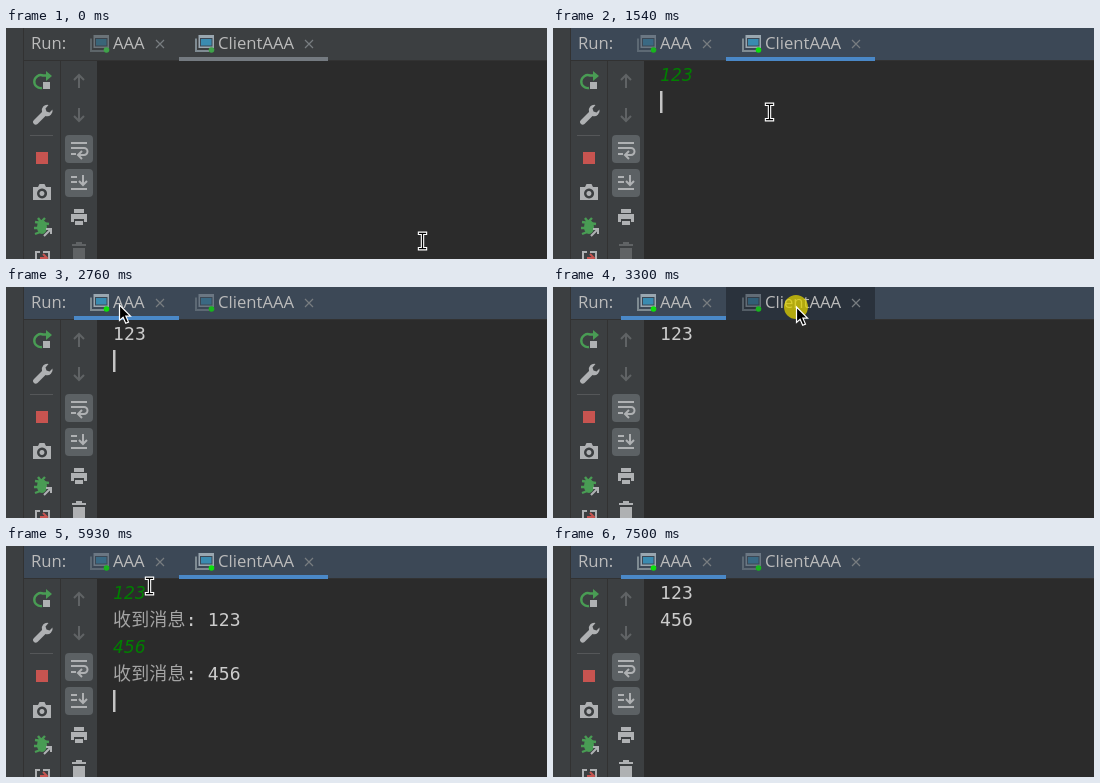
These frames come from a looping animation (541x231 px, 7.59 s). An HTML page:

```html
<!DOCTYPE html>
<html lang="en">
<head>
<meta charset="utf-8">
<title>Run console</title>
<style>
  html, body { margin: 0; width: 100%; height: 100%; overflow: hidden; background: #2b2b2b; }
  svg { display: block; }
  .ui { font: 16.7px "Open Sans", sans-serif; fill: #bbb; }
  .console { font: 18px "DejaVu Sans Mono", "Noto Sans CJK SC", "Noto Sans CJK", monospace; letter-spacing: .16px; fill: #ccc; }
  .label { font-weight: 300; fill: #a4a4a4; }
  .input { font-style: italic; fill: #007f00; }
  .line { fill: none; stroke: #afb1b3; stroke-width: 2; }
  .dim { stroke: #606365; }
  .green { stroke: #499c54; stroke-width: 2.4; }
  .red { stroke: #c75450; }
</style>
</head>
<body>
<svg width="541" height="231" viewBox="0 0 541 231">
  <path fill="#3c3f41" d="M0 0H91V231H0z"/>
  <path id="header" d="M18 0H541V33H18z"/>
  <path fill="#323232" d="M17 0h1v231h-1zM54 33h1v198h-1zM18 32h523v1H18z"/>
  <text class="ui" x="25" y="21">Run:</text>
  <g id="tabs"></g>

  <!-- left toolbar -->
  <g fill="#afb1b3">
    <path class="line green" d="M36 60a6.500 6.500 0 1 1 1-12.500h4"/>
    <path fill="#499c54" d="M40 43l6 5-6 5z"/>
    <path d="M37 54h7v7h-7z"/>
    <path d="M28 92l8-8a5.500 5.500 0 0 1 6.500-7l-3 3.500 1 3 3 1 3-3a5.500 5.500 0 0 1-7 6.500l-8 8a2.500 2.500 0 0 1-3.500-4z"/>
    <path fill="#555759" d="M24 107h23v1H24z"/>
    <path fill="#c75450" d="M30 124h12v12H30z"/>
    <path fill-rule="evenodd" d="M27 159h5l1.500-3h5l1.500 3h5v13H27zM36 160.500a5 5 0 1 0 .1 0zM36 163a2.500 2.500 0 1 1-.1 0z"/>
    <ellipse cx="36" cy="199" rx="5" ry="7" fill="#499c54"/>
    <path class="line green" d="M29 194l14 2M28 200h12M29 206l8-3M32 190l3 4 4-4"/>
    <path class="line" d="M38 208l7-7M40 201h5v5"/>
    <path class="line" d="M34 224h-4v9M37 224h6v9"/>
    <path class="line red" d="M34 230h6M37 226l4 4-4 4"/>
  </g>

  <!-- console toolbar -->
  <rect x="59" y="107" width="28" height="28" rx="4" fill="#5c6164"/>
  <rect x="59" y="141" width="28" height="28" rx="4" fill="#5c6164"/>
  <path class="line dim" d="M73 60V47M68 52l5-5 5 5M73 80v13M68 88l5 5 5-5"/>
  <path class="line" d="M65 115h16M65 120h13a3.500 3.500 0 0 1 0 7h-5M76 123l-4 4 4 4M65 126h5"/>
  <path class="line" d="M65 149h6M65 154h6M65 161h16M77 147v10M73 153l4 4 4-4"/>
  <path fill="#afb1b3" d="M68 181h10v4H68zM65 186h16v8h-3v-3H68v3h-3zM69 193h8v4h-8z"/>
  <path id="trash" d="M66 216h4v-2h6v2h4v2H66zM67 220h12v11H67z"/>

  <g id="lines" class="console"></g>
  <rect id="caret" width="2.500" height="22" fill="#c4c4c4"/>
  <circle id="click" r="12" fill="#e0d200" opacity=".75"/>
  <g id="beam" fill="none">
    <path id="beamShape" d="M-3-7.700H3M0-7.700V7.700M-3 7.700H3" stroke-linecap="square"/>
    <use href="#beamShape" stroke="#fff" stroke-width="3.400"/>
    <use href="#beamShape" stroke="#000" stroke-width="1.200"/>
  </g>
  <path id="arrow" fill="#000" stroke="#fff" stroke-width="1.200" d="M0 0V15.500L3.600 12.200 6.200 18.300 9 17.100 6.400 11.200H11z"/>
</svg>
<script>
const LOOP = 7590, CLICK = 80, BLINK = 1010, BLINK_ON = 540;
const $ = id => document.getElementById(id);

// Pointer moves: leave, arrive, destination
const moves = [
  [20, 210, 216, 84],
  [2000, 2380, 113, 18],
  [2770, 3250, 243, 20],
  [3400, 3600, 211, 94],
  [5640, 6100, 113, 16],
  [6290, 6650, 221, 104],
  [6750, 7180, 495, 245]
];
// The first click focuses the console, each later one switches tabs
const clicks = [210, 2530, 3300, 6170];
const messages = [
  { text: "123", first: 1140, last: 1230, enter: 1540, reply: 1770 },
  { text: "456", first: 4700, last: 4850, enter: 5230, reply: 5400 }
];
const keyTimes = ({ text, first, last }) =>
  [...text].map((_, i) => first + (last - first) * i / (text.length - 1));
const caretResets = [
  ...clicks.map(at => at + CLICK),
  ...messages.flatMap(m => [...keyTimes(m), m.enter, m.reply])
];

const tabs = [
  { label: "AAA", x: 68, width: 105 },
  { label: "ClientAAA", x: 173, width: 149 }
];
$("tabs").innerHTML = tabs.map(({ label, x, width }) => `
  <g transform="translate(${x})">
    <rect class="hover" width="${width}" height="33" fill="#2a323c"/>
    <g class="icon">
      <path class="line" style="stroke:#7f8b92" d="M17 10.500V23H30"/>
      <path fill="#9aa7b0" d="M19.500 7H35V20H19.500z"/>
      <path fill="#3c4855" d="M21 10H33.500V18.500H21z"/>
      <path fill="#3a8bb0" d="M22 11H32.500V17.500H22z"/>
    </g>
    <circle class="dot" cx="32.500" cy="22" r="2.800"/>
    <text class="ui" x="39" y="21">${label}</text>
    <path class="line" style="stroke:#787d80;stroke-width:1.200" d="M${width - 23} 12l8 8m0-8l-8 8"/>
    <rect class="underline" y="29" width="${width}" height="4"/>
  </g>`).join("");
const tabNodes = [...$("tabs").children];

const countPast = (times, t) => times.filter(at => at <= t).length;
const show = (node, on) => node.setAttribute("visibility", on ? "visible" : "hidden");
const place = (node, x, y) => node.setAttribute("transform", `translate(${x} ${y})`);
const fill = (node, color) => node.setAttribute("fill", color);

function pointerAt(t) {
  let x = 416, y = 213;
  for (const [leave, arrive, toX, toY] of moves) {
    const p = Math.max(0, Math.min(1, (t - leave) / (arrive - leave)));
    const eased = p * p * (3 - 2 * p);
    x += (toX - x) * eased;
    y += (toY - y) * eased;
  }
  return [Math.round(x), Math.round(y)];
}

// Lines on the visible console and the caret's cell
function consoleAt(t, client) {
  const lines = [];
  let row = 0, column = 0;
  for (const message of messages) {
    const { text, enter, reply } = message;
    if (client) {
      const typed = countPast(keyTimes(message), t);
      if (typed) lines.push(`<tspan class="input">${text.slice(0, typed)}</tspan>`);
      if (t >= reply) lines.push(`<tspan class="label">收到消息</tspan>: ${text}`);
      row += countPast([enter, reply], t);
      if (t < enter) column += typed;
    } else if (t >= reply) {
      row = lines.push(text);
    }
  }
  return { lines, row, column };
}

let shown = "";
function draw(t) {
  const releases = countPast(clicks, t - CLICK);
  const focused = releases > 0;
  const client = !focused || releases % 2 === 1;
  const [x, y] = pointerAt(t);

  fill($("header"), focused ? "#3c4856" : "#3c3f41");
  fill($("trash"), t < messages[0].reply ? "#606365" : "#afb1b3");
  tabNodes.forEach((node, i) => {
    const tab = tabs[i], selected = client === (i === 1);
    const part = name => node.querySelector("." + name);
    show(part("hover"), !selected && y < 33 && x >= tab.x && x < tab.x + tab.width);
    show(part("underline"), selected);
    fill(part("underline"), focused ? "#4a88c7" : "#747a80");
    part("icon").setAttribute("opacity", selected ? 1 : .5);
    fill(part("dot"), !focused ? "#3fa34a" : selected ? "#0ce00c" : "#18b41e");
  });

  const { lines, row, column } = consoleAt(t, client);
  const markup = lines.map((line, i) => `<text x="107" y="${53 + 27 * i}">${line}</text>`).join("");
  if (markup !== shown) $("lines").innerHTML = shown = markup;

  const idle = t - Math.max(...caretResets.filter(at => at <= t));
  show($("caret"), focused && t < 7500 && idle % BLINK < BLINK_ON);
  place($("caret"), 107 + 11 * column, 36 + 27 * row);

  const inConsole = y >= 33 && x >= 92;
  show($("click"), clicks.some(at => t >= at && t < at + CLICK));
  show($("beam"), inConsole);
  show($("arrow"), !inConsole);
  place($("click"), x, y);
  place($("beam"), x + .5, y);
  place($("arrow"), x + .5, y);
}

function frame() {
  draw(performance.now() % LOOP);
  requestAnimationFrame(frame);
}
frame();
</script>
</body>
</html>
```
